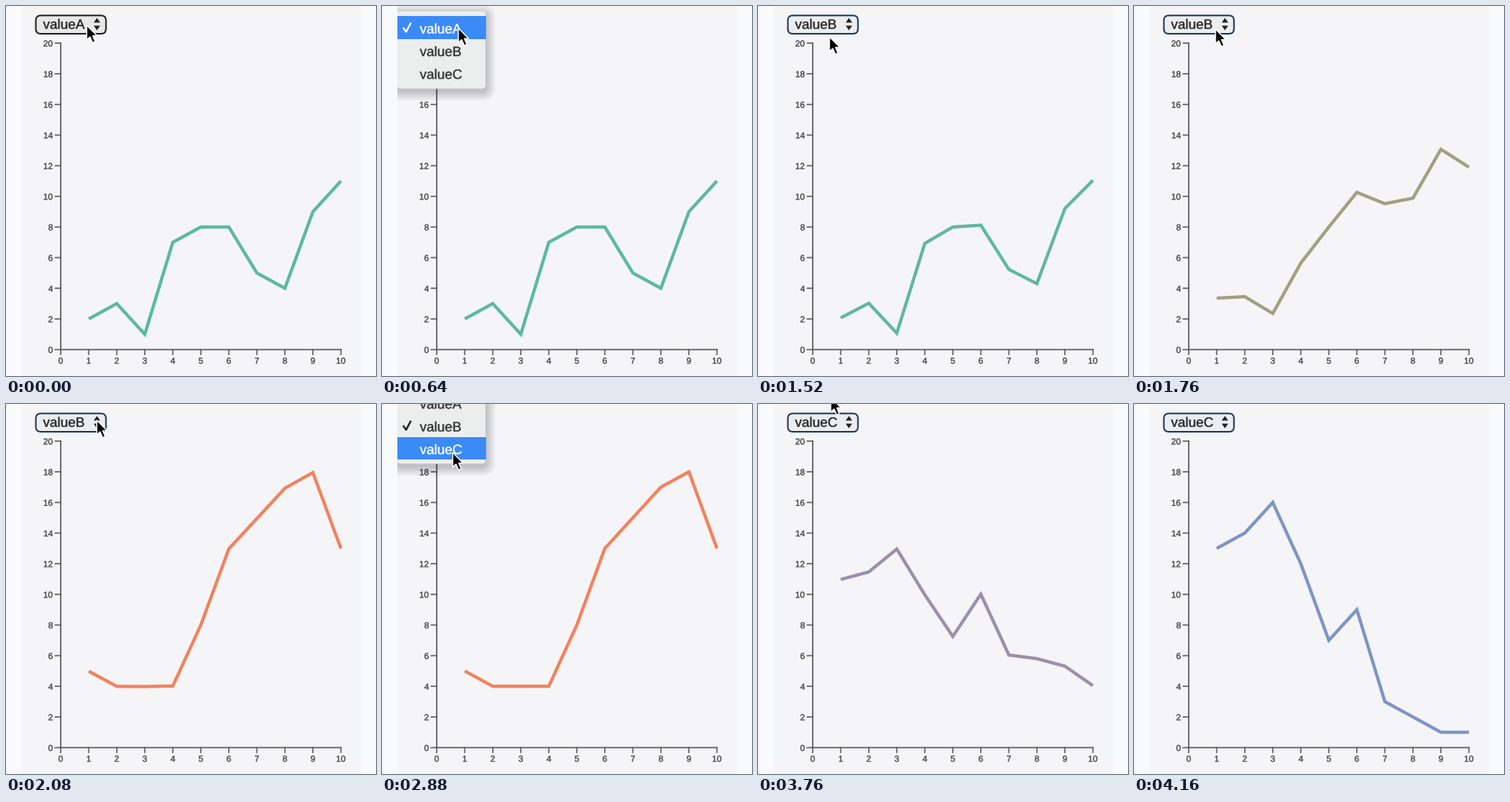
Write a matplotlib script that moves like this. It is 480x480 px and loops after 4.32 s.

```python
import matplotlib.pyplot as plt
import numpy as np
from matplotlib.animation import FuncAnimation
from matplotlib.colors import to_rgb
from matplotlib.patches import FancyBboxPatch, Polygon, Rectangle
from matplotlib.patheffects import Stroke

SIZE, DPI = 480, 100
STEP, FRAMES = 80, 54
PT = 72 / DPI  # points per pixel

NAMES = ["valueA", "valueB", "valueC"]
SERIES = np.array([
    [2, 3, 1, 7, 8, 8, 5, 4, 9, 11],
    [5, 4, 4, 4, 8, 13, 15, 17, 18, 13],
    [13, 14, 16, 12, 7, 9, 3, 2, 1, 1],
])
COLORS = np.array([to_rgb(c) for c in ("#5bba9b", "#f3825c", "#7f94c4")])
AXIS = "#646464"
INK = "#404040"
DARK = "#222222"
BLUE = "#3a8af7"

# (start ms, series after the change)
CHANGES = [(1378, 1), (3285, 2)]
MORPH = 790

# pointer tip: time, x, y
POINTER = np.array([
    (80, 104, 24), (480, 99, 27), (720, 98, 28), (800, 98, 28), (880, 92, 47),
    (960, 88, 58), (1360, 88, 58), (1520, 92, 39), (1760, 105, 29),
    (2080, 117, 20), (2320, 116, 20), (2480, 114, 22), (2880, 91, 62),
    (3200, 91, 62), (3440, 86, 58), (3520, 87, 52), (3840, 96, -30),
])
ARROW = np.array([(0.7, 1), (0.7, 20), (5, 16), (8.4, 23.6), (11.7, 22.2),
                  (8.5, 14.6), (14, 14.4)])

fig = plt.figure(figsize=(SIZE / DPI, SIZE / DPI), dpi=DPI)
ax = fig.add_axes([0, 0, 1, 1])
ax.set_xlim(0, SIZE)
ax.set_ylim(SIZE, 0)
ax.axis("off")


def px(v):
    return 71 + 36.35 * np.asarray(v)


def py(v):
    return 445.7 - 19.875 * np.asarray(v)


def label(x, y, text, size, color=INK, **kw):
    """Text with slightly thickened outlines."""
    return ax.text(x, y, text, fontsize=size * PT, color=color,
                   family="Liberation Sans", va="baseline",
                   path_effects=[Stroke(linewidth=0.35 * PT)], **kw)


def rounded(x0, y0, x1, y1, radius, **kw):
    style = f"round,pad=0,rounding_size={radius}"
    return ax.add_patch(FancyBboxPatch((x0, y0), x1 - x0, y1 - y0,
                                       boxstyle=style, **kw))


def stroke(xs, ys, width, color, **kw):
    return ax.plot(xs, ys, color=color, lw=width * PT, snap=False, **kw)[0]


def draw_page():
    ax.add_patch(Rectangle((0, 0), SIZE, SIZE, fc="#f5f5f8", lw=0, zorder=0))
    for x, w in ((0, 20), (461, 19)):
        ax.add_patch(Rectangle((x, 0), w, SIZE, fc="#f9fafc", lw=0, zorder=7))


def draw_axes():
    left, right, top, floor = px(0), px(10), py(20), py(0)
    stroke([left, left], [top, floor], 1.8, AXIS)
    stroke([left, right], [floor, floor], 1.8, AXIS)
    for v in range(0, 21, 2):
        stroke([64, left], [py(v)] * 2, 1.7, AXIS)
        label(61, py(v) + 4.3, str(v), 11.2, ha="right")
    for v in range(11):
        stroke([px(v)] * 2, [floor, 452], 1.7, AXIS)
        label(px(v), 464, str(v), 11.2, ha="center")


class Select:
    def __init__(self):
        self.box = rounded(38.7, 12.3, 129.7, 36, 6.5, fc="#e8e8e9",
                           ec=DARK, lw=2 * PT, zorder=3)
        self.text = label(48, 29.6, NAMES[0], 17.7, DARK, zorder=4)
        for base, tip in ((21.5, 15.5), (25.5, 31.5)):
            ax.add_patch(Polygon([(113.8, base), (122.2, base), (118, tip)],
                                 fc=DARK, lw=0, zorder=4))

    def update(self, index):
        self.text.set_text(NAMES[index])
        self.box.set_edgecolor("#1f3a5f" if index else DARK)
        self.box.set_facecolor("#ebedef" if index else "#e8e8e9")


class Menu:
    """Popup whose checked row sits over the select box."""

    ROW = 29.5
    LEFT, RIGHT = 19.5, 134.5

    def __init__(self, checked):
        self.checked = checked
        self.rows = [29 + self.ROW * (i - checked) for i in range(3)]
        top, bottom = self.rows[0] - 22.7, self.rows[2] + 19.2
        self.parts = []
        for grow in range(13, 0, -1):
            self.add(rounded(self.LEFT - grow, top - grow + 5,
                             self.RIGHT + grow, bottom + grow + 3, 5 + grow,
                             fc="black", lw=0, zorder=5), 0.015)
        self.add(rounded(self.LEFT, top, self.RIGHT, bottom, 5, fc="#eceeee",
                         ec="#c9cbcc", lw=0.7 * PT, zorder=5))
        self.bar = self.add(Rectangle((self.LEFT, 0), self.RIGHT - self.LEFT,
                                      self.ROW, fc=BLUE, lw=0, zorder=5.2))
        ax.add_patch(self.bar)
        y = self.rows[checked]
        self.check = self.add(stroke([28, 31.3, 37], [y, y + 4.5, y - 6.3],
                                     2.4, DARK, zorder=5.4))
        self.texts = [self.add(label(49, y + 6.5, name, 17.7, zorder=5.4))
                      for name, y in zip(NAMES, self.rows)]

    def add(self, part, alpha=1.0):
        self.parts.append((part, alpha))
        return part

    def update(self, alpha, active):
        for part, base in self.parts:
            part.set_visible(alpha > 0)
            part.set_alpha(base * alpha)
        for i, text in enumerate(self.texts):
            text.set_color("white" if i == active else "#303030")
        self.check.set_color("white" if active == self.checked else DARK)
        if active is None:
            self.bar.set_visible(False)
        else:
            self.bar.set_y(self.rows[active] - self.ROW / 2 - 0.9)


def ease(t):
    t = min(max(t, 0), 1)
    return 4 * t ** 3 if t < 0.5 else 1 - 4 * (1 - t) ** 3


def menu_state(ms, opened, moved, picked, old):
    """Opacity and highlighted row; the choice blinks once, then fades."""
    if not opened <= ms < picked + 240:
        return 0, None
    alpha = 0.4 if ms >= picked + 160 else 1
    if picked <= ms < picked + 80:
        return alpha, None
    return alpha, old if ms < moved else old + 1


draw_page()
draw_axes()
curve = stroke(px(range(1, 11)), py(SERIES[0]), 4.2, COLORS[0], zorder=2,
               solid_joinstyle="miter", solid_capstyle="butt")
select = Select()
menus = [(Menu(0), (640, 880, 1120)), (Menu(1), (2480, 2720, 3040))]
pointer = ax.add_patch(Polygon(ARROW, fc="black", ec="white", lw=1.4 * PT,
                               joinstyle="miter", zorder=8))


def update(frame):
    ms = frame * STEP
    values, color, chosen = SERIES[0], COLORS[0], 0
    for start, index in CHANGES:
        k = ease((ms - start) / MORPH)
        values = values + (SERIES[index] - values) * k
        color = color + (COLORS[index] - color) * k
        if ms >= start - 20:
            chosen = index
    curve.set_ydata(py(values))
    curve.set_color(color)
    select.update(chosen)
    for old, (menu, times) in enumerate(menus):
        menu.update(*menu_state(ms, *times, old))
    tip = [np.interp(ms, POINTER[:, 0], POINTER[:, i]) for i in (1, 2)]
    pointer.set_xy(ARROW + tip)
    return []


anim = FuncAnimation(fig, update, frames=FRAMES, interval=STEP, repeat=True,
                     repeat_delay=0, init_func=lambda: update(0))
plt.show()
```
